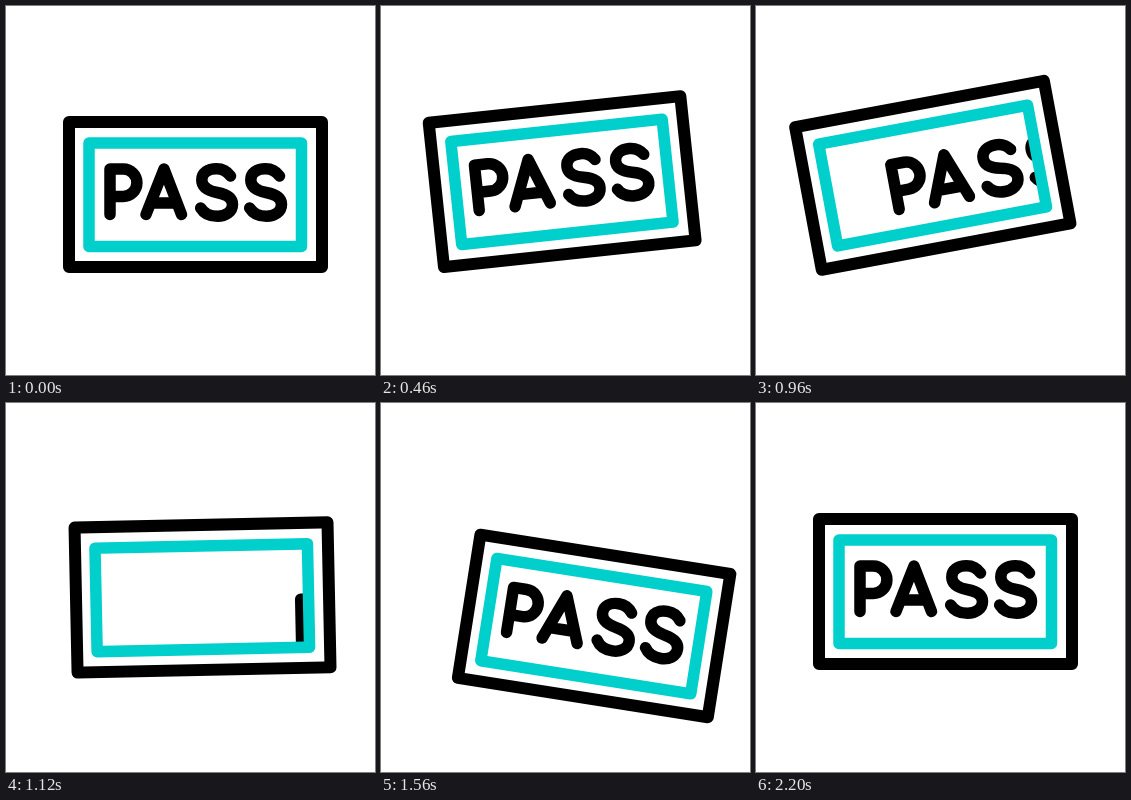
An HTML page for the animation above (2400 ms loop, 369 by 369 pixels).

```html
<!DOCTYPE html>
<html lang="en">
<head>
<meta charset="utf-8">
<title>Pass stamp</title>
<style>
  html, body { margin: 0; width: 100%; height: 100%; overflow: hidden; background: #fff; }
  svg { display: block; width: 100vw; height: 100vh; }
  svg * { fill: none; stroke-linecap: round; stroke-linejoin: round; }
</style>
</head>
<body>
<svg viewBox="0 0 369 369" role="img" aria-label="PASS">
  <defs>
    <clipPath id="window"><rect x="83" y="137" width="212.5" height="103.5"/></clipPath>
    <path id="s" d="M224.5 170C221 165 216.500 162.700 210.500 162.700C202 162.700 195.800 167 195.800 174C195.800 181.500 202 184.700 211 186.500C220.500 188.300 226.500 191.500 226.500 198.500C226.500 206 219.500 210.300 211.500 210.300C204 210.300 198 207.500 194.700 202"/>
  </defs>
  <g id="stamp">
    <rect x="63" y="116" width="253" height="145" stroke="#000" stroke-width="12"/>
    <g clip-path="url(#window)">
      <g id="word" stroke="#000" stroke-width="11.5">
        <path d="M104 208.500V163H117.200a13.700 13.700 0 0 1 0 27.400H104"/>
        <path d="M140 208.500L158 163L175.500 208.500M146 197H170"/>
        <use href="#s"/>
        <use href="#s" x="49"/>
      </g>
    </g>
    <rect x="83" y="137" width="212.500" height="103.500" stroke="#01cfcb" stroke-width="11.5"/>
  </g>
</svg>
<script>
  const LOOP = 2400;
  const SHIFT = 15.5;
  const SLIDE = { start: 800, end: 1470, reach: 200, drift: 0.16 };

  // time, angle in degrees, share of the diagonal shift
  const poses = [
    [0, 0, 0], [200, 0, 0], [800, -15, 0], [1400, 10, 1], [2200, 0, 0], [LOOP, 0, 0]
  ];

  const stamp = document.getElementById('stamp');
  const word = document.getElementById('word');
  const clamp = x => Math.min(1, Math.max(0, x));
  const ease = x => x * x * (3 - 2 * x);
  const mix = (a, b, k) => a + (b - a) * k;

  function poseAt(t) {
    const i = poses.findIndex(p => p[0] > t);
    const a = poses[i - 1], b = poses[i];
    const k = ease((t - a[0]) / (b[0] - a[0]));
    return { angle: mix(a[1], b[1], k), shift: SHIFT * mix(a[2], b[2], k) };
  }

  // The word leaves on the right, then comes back in from the left.
  function slideAt(t) {
    const p = 2 * clamp((t - SLIDE.start) / (SLIDE.end - SLIDE.start));
    if (p < 1) {
      const x = SLIDE.reach * p * p;
      return [x, x * SLIDE.drift];
    }
    return [-SLIDE.reach * (2 - p) ** 2, 0];
  }

  function draw(t) {
    const { angle, shift } = poseAt(t);
    stamp.setAttribute('transform', `translate(${shift} ${shift}) rotate(${angle} 63 261)`);
    word.setAttribute('transform', `translate(${slideAt(t)})`);
  }

  const begin = performance.now();
  function tick() {
    draw((performance.now() - begin) % LOOP);
    requestAnimationFrame(tick);
  }
  tick();
</script>
</body>
</html>
```
